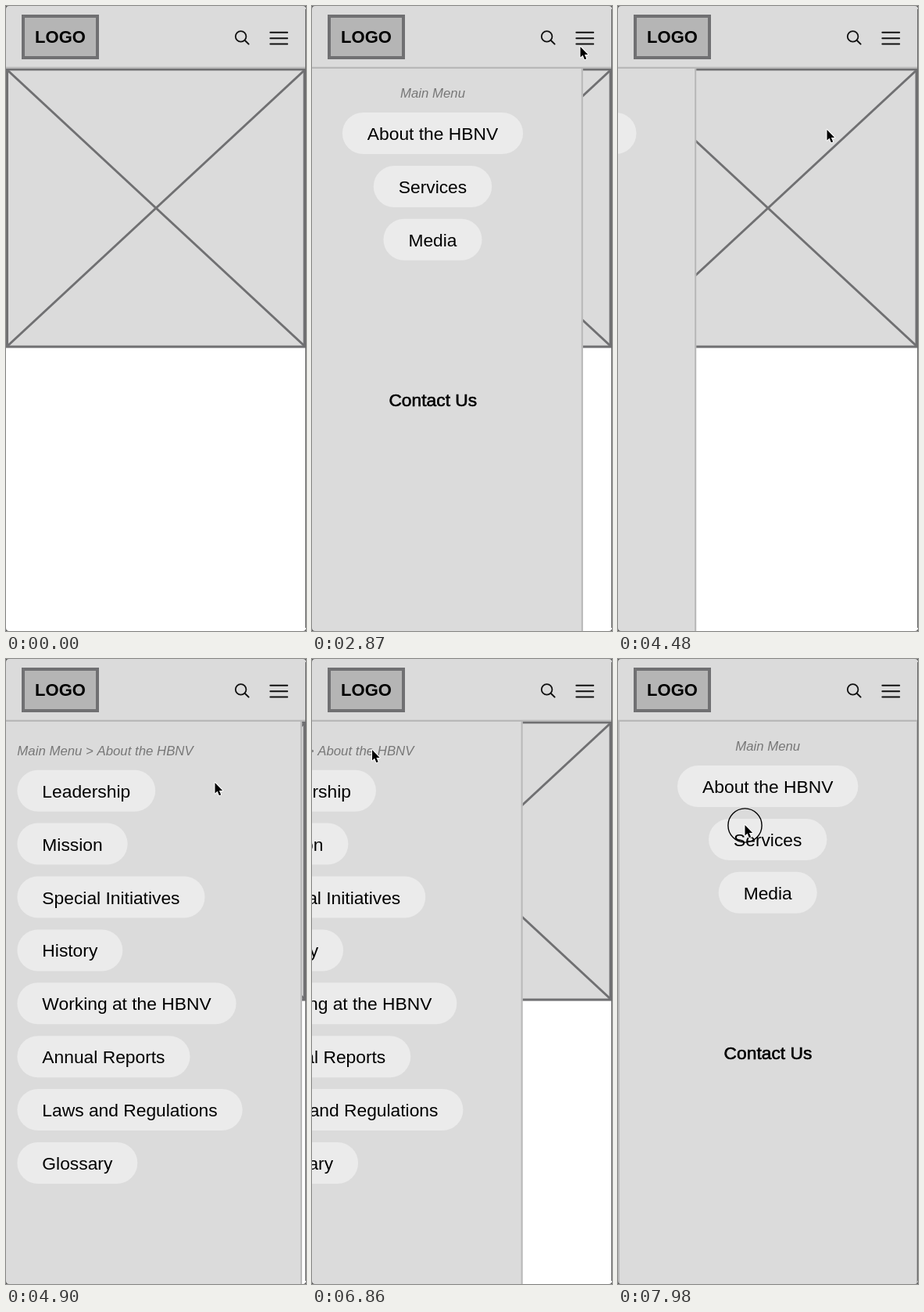
These frames come from a looping animation (384 px wide and 798 px high, 8000 ms). An HTML page with a canvas:

```html
<!DOCTYPE html>
<html lang="en">
<head>
<meta charset="utf-8">
<title>Mobile menu wireframe</title>
<style>
  html, body { margin: 0; width: 100%; height: 100%; overflow: hidden; background: #fff; }
  canvas { display: block; width: 384px; height: 798px; }
</style>
</head>
<body>
<canvas id="stage"></canvas>
<script>
const W = 384, H = 798, LOOP = 8000, STEP = 70;
const GREY = '#dbdbdb', LINE = '#b8b8b8', DARK = '#707072', PILL = '#ebebeb';
const FAMILY = '"Liberation Sans", Arial, sans-serif';
const BODY = '22.8px ' + FAMILY, CRUMB = 'italic 16.8px ' + FAMILY;

const canvas = document.getElementById('stage');
const ctx = canvas.getContext('2d');
const dpr = window.devicePixelRatio || 1;
canvas.width = W * dpr;
canvas.height = H * dpr;

const mainItems = ['About the HBNV', 'Services', 'Media'];
const subItems = ['Leadership', 'Mission', 'Special Initiatives', 'History',
  'Working at the HBNV', 'Annual Reports', 'Laws and Regulations', 'Glossary'];

// Pointer stops: time, x, y
const path = [
  [1820, 233, 598], [1960, 254, 505], [2030, 254, 505], [2100, 292, 260],
  [2170, 343, 21], [2240, 343.5, 52], [3500, 343.5, 52], [3990, 267.5, 158],
  [5390, 267.5, 158], [5670, 203, 171], [5880, 149, 170], [6020, 148, 132],
  [6160, 148, 132], [6370, 83, 121], [6510, 77, 116], [7210, 77, 116],
  [7490, 100, 174], [7770, 162.5, 212]
];
const handTimes = [[3850, 4410], [5670, 5950], [6340, 6860]];
// Click rings: start, end, radius, opacity
const rings = [
  [2520, 2590, 22, 1], [2590, 2660, 36, .3], [4200, 4270, 32, .4],
  [6580, 6720, 22, 1], [6720, 6790, 32, .4], [7980, 8000, 22, 1]
];
// Panel runs: start, panel, direction
const slides = [
  [2705, drawMain, 'in'], [4385, drawMain, 'out'], [4595, drawSub, 'in'],
  [6835, drawSub, 'out'], [7045, drawMain, 'in']
];

const within = (t, [a, b]) => t >= a && t < b;
const expoOut = u => u >= 1 ? 1 : 1 - 2 ** (-10 * u);
const smooth = u => u * u * (3 - 2 * u);

function text(str, x, y, font, color = '#000', align = 'left') {
  ctx.font = font;
  ctx.fillStyle = color;
  ctx.textAlign = align;
  ctx.fillText(str, x, y);
}

function line(color, width, ...pts) {
  ctx.strokeStyle = color;
  ctx.lineWidth = width;
  ctx.beginPath();
  for (let i = 0; i < pts.length; i += 2) ctx.lineTo(pts[i], pts[i + 1]);
  ctx.stroke();
}

function box(x, y, w, h, fill, stroke, width) {
  ctx.fillStyle = fill;
  ctx.fillRect(x, y, w, h);
  ctx.strokeStyle = stroke;
  ctx.lineWidth = width;
  ctx.strokeRect(x + width / 2, y + width / 2, w - width, h - width);
}

function pill(label, x, y, centred) {
  ctx.font = BODY;
  const w = ctx.measureText(label).width + 64;
  const left = centred ? x - w / 2 : x;
  ctx.fillStyle = PILL;
  ctx.beginPath();
  ctx.roundRect(left, y, w, 53, 26.5);
  ctx.fill();
  text(label, left + 32, y + 35, BODY);
}

function drawPage() {
  ctx.fillStyle = '#fff';
  ctx.fillRect(0, 0, W, H);
  box(0, 79.5, W - .5, 357, GREY, DARK, 3);
  line(DARK, 3, 2, 82, 382, 434);
  line(DARK, 3, 382, 82, 2, 434);
}

function drawHeader() {
  ctx.fillStyle = GREY;
  ctx.fillRect(0, 0, W, 79);
  line(LINE, 2, 0, 78.7, W, 78.7);
  box(20, 11, 99, 57, '#b5b5b5', DARK, 4);
  text('LOGO', 69.5, 47, 'bold 22px ' + FAMILY, '#000', 'center');
  ctx.lineCap = 'round';
  ctx.strokeStyle = '#111';
  ctx.lineWidth = 1.8;
  ctx.beginPath();
  ctx.arc(300.6, 38.9, 6.8, 0, 7);
  ctx.stroke();
  line('#111', 2, 305.6, 43.8, 310.6, 48.6);
  for (const y of [33.8, 41.2, 48.5]) line('#111', 1.9, 338.3, y, 360.2, y);
  ctx.lineCap = 'butt';
}

function drawMain() {
  text('Main Menu', 191.7, 117, CRUMB, '#777', 'center');
  mainItems.forEach((label, i) => pill(label, 191.7, 136 + i * 67.9, true));
  text('Contact Us', 192, 511, BODY, '#000', 'center');
  ctx.strokeStyle = '#000';
  ctx.lineWidth = .6;
  ctx.strokeText('Contact Us', 192, 511);
}

function drawSub() {
  text('Main Menu > About the HBNV', 19.5, 123, CRUMB, '#777');
  subItems.forEach((label, i) => pill(label, 19.5, 141.7 + i * 67.9));
}

function drawPanels(t) {
  slides.forEach(([start, content, dir], i) => {
    if (t < start) return;
    const next = slides[i + 1];
    if (dir === 'in' && next && t >= next[0]) return;
    const p = expoOut((t - start) / 490);
    const shift = -W * (dir === 'in' ? 1 - p : p);
    if (shift <= -W) return;
    ctx.save();
    ctx.translate(shift, 0);
    box(0, 78, W, H - 76, GREY, LINE, 2);
    content();
    ctx.restore();
  });
}

function drawFrame() {
  line('#6a6a6a', 1, W - .5, 4, W - .5, H - 4);
  ctx.fillStyle = '#555';
  ctx.beginPath();
  ctx.rect(0, 0, W, H);
  ctx.roundRect(0, 0, W, H, 4);
  ctx.fill('evenodd');
}

const arrow = new Path2D('M0 0V13.6L3.1 10.8L5.4 16.2L7.7 15.2L5.4 10H9.7Z');
const hand = new Path2D('M-1.6 9V1.2Q-1.6 0 -.4 0T.9 1.2V5.2Q1.2 4.3 2.2 4.5T3.3 5.8' +
  'Q3.6 4.9 4.6 5.2T5.6 6.4Q6 5.7 6.8 6.1T7.6 7.6V10.5Q7.6 12.4 6.4 13.6V15.8H-.4V14.4' +
  'L-4.4 9.6Q-5 8.3 -3.8 7.7T-1.6 9Z');

function pointerAt(t) {
  const i = path.findIndex(k => k[0] > t);
  if (i < 0) return path[path.length - 1].slice(1);
  const [t0, x0, y0] = path[i - 1], [t1, x1, y1] = path[i];
  const u = smooth((t - t0) / (t1 - t0));
  return [x0 + (x1 - x0) * u, y0 + (y1 - y0) * u];
}

function drawPointer(t) {
  if (t < path[0][0]) return;
  const isHand = handTimes.some(span => within(t, span));
  const shape = isHand ? hand : arrow;
  ctx.save();
  ctx.translate(...pointerAt(t));
  for (const ring of rings) {
    if (!within(t, ring)) continue;
    ctx.globalAlpha = ring[3];
    ctx.strokeStyle = '#000';
    ctx.lineWidth = 1.4;
    ctx.beginPath();
    ctx.arc(0, .5, ring[2] - .4, 0, 7);
    ctx.stroke();
  }
  ctx.globalAlpha = 1;
  ctx.lineJoin = 'round';
  ctx.strokeStyle = isHand ? '#111' : '#fff';
  ctx.lineWidth = isHand ? 1.1 : 2;
  ctx.fillStyle = isHand ? '#fff' : '#000';
  ctx.stroke(shape);
  ctx.fill(shape);
  if (isHand) {
    for (const x of [1.6, 3.5, 5.4]) line('#111', .8, x, 9.5, x, 12.5);
  }
  ctx.restore();
}

function render(now) {
  const t = Math.floor((now % LOOP) / STEP) * STEP;
  ctx.setTransform(dpr, 0, 0, dpr, 0, 0);
  drawPage();
  drawPanels(t);
  drawHeader();
  drawFrame();
  drawPointer(t);
}

const begin = performance.now();
function tick() {
  render(performance.now() - begin);
  requestAnimationFrame(tick);
}
tick();
</script>
</body>
</html>
```
